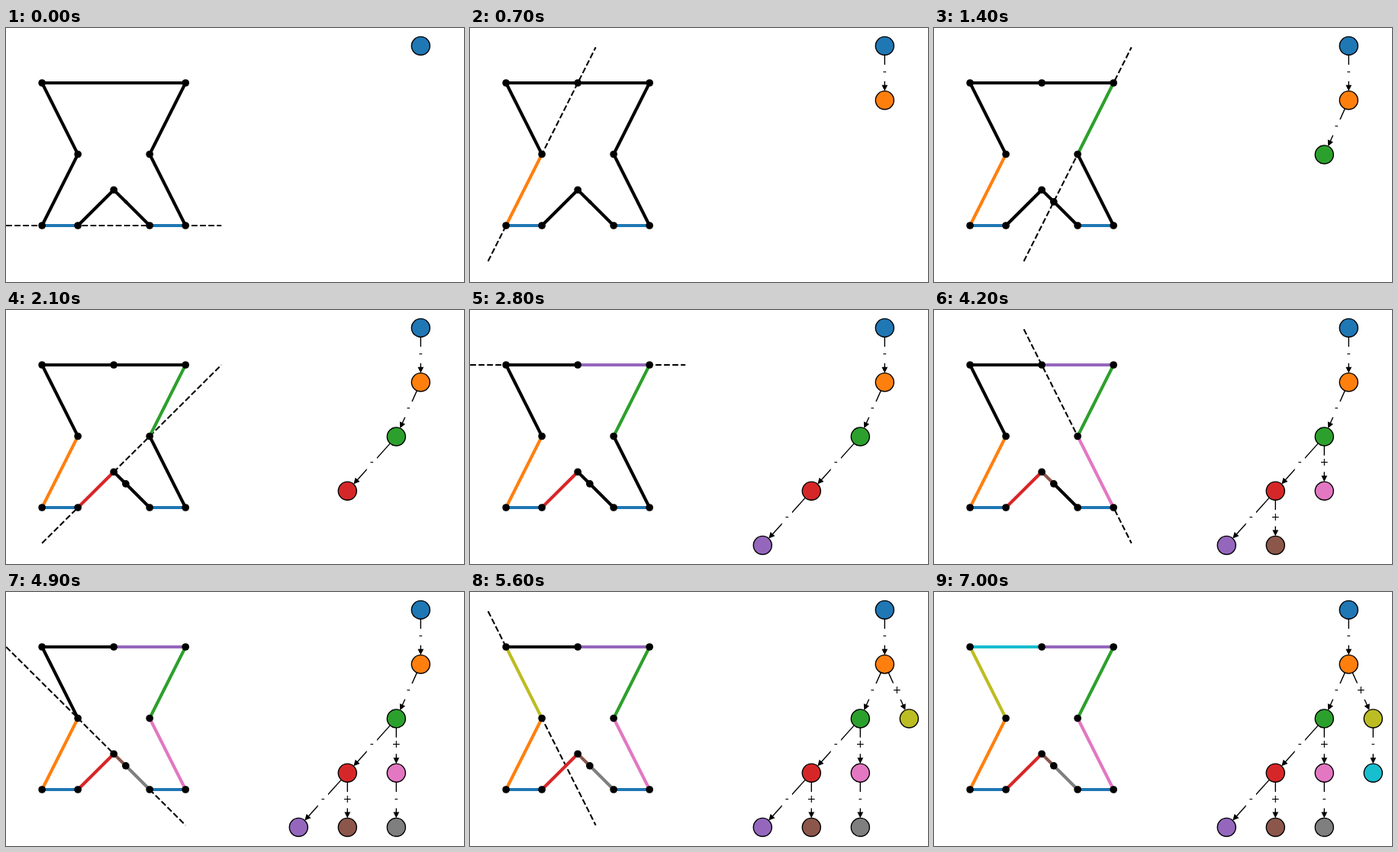
Animation, 600 px wide and 333 px high, one loop 9000 ms. Source, as an HTML page:

```html
<!DOCTYPE html>
<html lang="en">
<head>
<meta charset="utf-8">
<title>Binary space partition</title>
<style>
  html, body { margin: 0; width: 100%; height: 100%; overflow: hidden; background: #fff; }
  svg { display: block; width: 600px; height: 333px; }
  text { font: 13.9px "DejaVu Sans", sans-serif; text-anchor: middle; }
  .wall { stroke-width: 4.17; stroke-linecap: square; }
  .cut { stroke: #000; stroke-width: 2.08; stroke-dasharray: 7.7 3.34; }
  .edge { stroke: #000; stroke-width: 1.39; }
  .node { stroke: #000; stroke-width: 1.39; }
</style>
</head>
<body>
<svg id="stage" viewBox="0 0 600 333"></svg>
<script>
const STEP = 700, LOOP = 9000, LAST = 10;
const RADIUS = 12.03;
const stage = document.getElementById('stage');

// Grid units to pixels: plot on the left (y up), tree on the right (y down).
const plot = ([x, y]) => [0.2 + 47 * x, 305.75 - 46.75 * y];
const tree = ([col, row]) => [383.3 + 32 * col, 23.4 + 71.25 * row];

const notch = [10 / 3, 5 / 3];

// One split per step: wall pieces, slope and intercept of the cutting line, tree place, parent, side.
const splits = [
  { color: '#1f77b4', walls: [[[1, 1], [2, 1]], [[4, 1], [5, 1]]], cut: [0, 1], at: [5, 0] },
  { color: '#ff7f0e', walls: [[[1, 1], [2, 3]]], cut: [2, -1], at: [5, 1], parent: 0, side: '-' },
  { color: '#2ca02c', walls: [[[4, 3], [5, 5]]], cut: [2, -5], at: [4, 2], parent: 1, side: '-' },
  { color: '#d62728', walls: [[[2, 1], [3, 2]]], cut: [1, -1], at: [2, 3], parent: 2, side: '-' },
  { color: '#9467bd', walls: [[[3, 5], [5, 5]]], cut: [0, 5], at: [0, 4], parent: 3, side: '-' },
  { color: '#8c564b', walls: [[[3, 2], notch]], cut: [-1, 5], at: [2, 4], parent: 3, side: '+' },
  { color: '#e377c2', walls: [[[4, 3], [5, 1]]], cut: [-2, 11], at: [4, 3], parent: 2, side: '+' },
  { color: '#7f7f7f', walls: [[notch, [4, 1]]], cut: [-1, 5], at: [4, 4], parent: 6, side: '-' },
  { color: '#bcbd22', walls: [[[1, 5], [2, 3]]], cut: [-2, 7], at: [6, 2], parent: 1, side: '+' },
  { color: '#17becf', walls: [[[1, 5], [3, 5]]], cut: [0, 5], at: [6, 3], parent: 8, side: '-' }
];

// Vertices with the step at which each one appears.
const corners = [[1, 1], [2, 1], [3, 2], [4, 1], [5, 1], [4, 3], [5, 5], [1, 5], [2, 3]];
const vertices = [...corners.map(p => [p, 0]), [[3, 5], 1], [notch, 2]];

const timed = [];

function add(tag, attrs, from = 0, to = LAST) {
  const el = document.createElementNS('http://www.w3.org/2000/svg', tag);
  for (const name in attrs) el.setAttribute(name, attrs[name]);
  stage.append(el);
  timed.push({ el, from, to });
  return el;
}

function addLine([x1, y1], [x2, y2], attrs, from, to) {
  return add('line', { x1, y1, x2, y2, ...attrs }, from, to);
}

function addCut([slope, offset], step) {
  const ends = slope ? [-offset / slope, (6 - offset) / slope].sort((a, b) => a - b) : [0, 6];
  const [a, b] = [Math.max(0, ends[0]), Math.min(6, ends[1])]
    .map(x => plot([x, slope * x + offset]));
  addLine(a, b, { class: 'cut' }, step, step);
}

function addArrow(a, b, step) {
  const length = Math.hypot(b[0] - a[0], b[1] - a[1]);
  const ux = (b[0] - a[0]) / length, uy = (b[1] - a[1]) / length;
  const point = (along, across = 0) =>
    [a[0] + ux * along - uy * across, a[1] + uy * along + ux * across];
  const tip = length - RADIUS - 1.55, back = tip - 5.56;
  addLine(point(RADIUS), point(back), { class: 'edge' }, step);
  add('polygon', {
    class: 'edge',
    points: [point(tip), point(back, 2.78), point(back, -2.78)].join(' ')
  }, step);
}

function addLabel(a, b, side, step) {
  const x = (a[0] + b[0]) / 2, y = (a[1] + b[1]) / 2;
  const half = side === '+' ? 10 : 6.7;
  add('rect', { x: x - half, y: y - 10.8, width: 2 * half, height: 21.6, rx: 4, fill: '#fff' }, step);
  add('text', { x, y: y + 2.8 }, step).textContent = side;
}

splits.forEach((split, step) => addCut(split.cut, step));

splits.forEach(({ walls, color }, step) => {
  for (const [a, b] of walls) {
    if (step) addLine(plot(a), plot(b), { class: 'wall', stroke: '#000' }, 0, step - 1);
    addLine(plot(a), plot(b), { class: 'wall', stroke: color }, step);
  }
});

for (const [p, step] of vertices) {
  const [cx, cy] = plot(p);
  add('circle', { cx, cy, r: 4.86 }, step);
}

const children = splits.map((split, step) => ({ ...split, step })).slice(1);
const ends = ({ parent, at }) => [tree(splits[parent].at), tree(at)];
children.forEach(c => addArrow(...ends(c), c.step));
children.forEach(c => addLabel(...ends(c), c.side, c.step));

splits.forEach(({ at, color }, step) => {
  const [cx, cy] = tree(at);
  add('circle', { cx, cy, r: RADIUS, class: 'node', fill: color }, step);
});

let start, shown = -1;

function show(step) {
  if (step === shown) return;
  shown = step;
  for (const { el, from, to } of timed) {
    el.style.display = step >= from && step <= to ? '' : 'none';
  }
}

function tick(now) {
  start ??= now;
  show(Math.min(LAST, Math.floor((now - start) % LOOP / STEP)));
  requestAnimationFrame(tick);
}

show(0);
requestAnimationFrame(tick);
</script>
</body>
</html>
```
